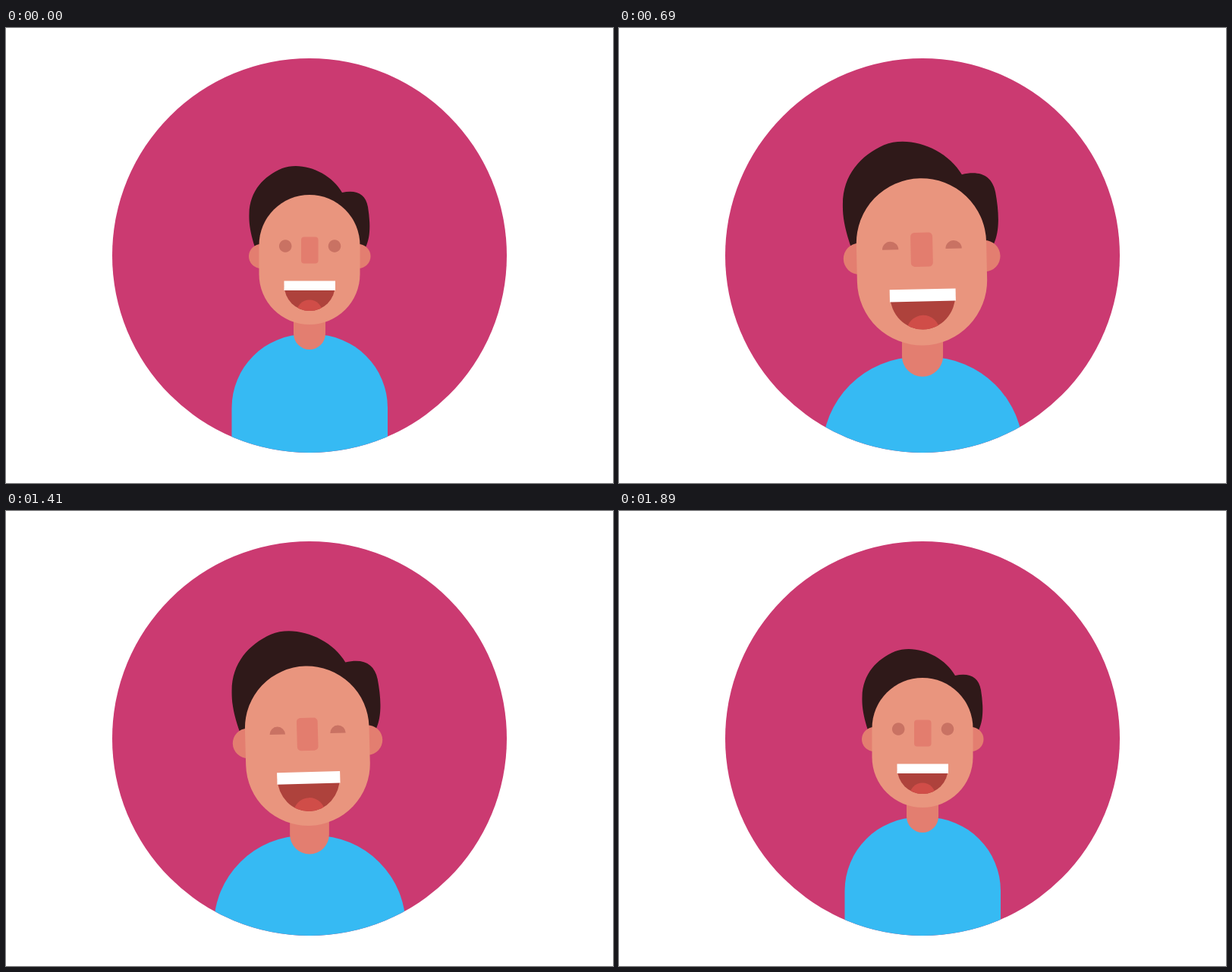
These frames come from a looping animation (800x600 px, 1950 ms). An HTML page:

```html
<!DOCTYPE html>
<html lang="en">
<head>
<meta charset="utf-8">
<title>Laughing man</title>
<style>
  html, body { margin: 0; height: 100%; overflow: hidden; background: #fff; }
  svg { display: block; width: 100vw; height: 100vh; }
</style>
</head>
<body>
<svg viewBox="0 0 800 600">
  <clipPath id="disc"><circle cx="400" cy="300" r="260"/></clipPath>
  <clipPath id="mouthClip"><path class="mouth"/></clipPath>
  <circle cx="400" cy="300" r="260" fill="#cb3a71"/>
  <g clip-path="url(#disc)">
    <g id="man">
      <path fill="#36baf3" d="M297.5 620V501A97 97 0 0 1 394.5 404H406A97 97 0 0 1 503 501V620Z"/>
      <rect x="379" y="340" width="42" height="84" rx="21" fill="#e37e70"/>
      <g id="head">
        <path fill="#2f1919" d="M328 289C322 270 320 258 320.5 245C321 215 340 195 364 185C390 175 428 190 443 217C462 213 474 219 477 236C480 255 481 275 474 289Z"/>
        <g fill="#e37e70">
          <circle cx="336" cy="301" r="16"/>
          <circle cx="464.5" cy="301" r="16"/>
        </g>
        <rect x="333.5" y="220" width="133" height="171" rx="66.5" fill="#e9957e"/>
        <rect x="389" y="275.5" width="22.5" height="35" rx="4" fill="#e37d6e"/>
        <path id="eyes" fill="#c97263"/>
        <path class="mouth" fill="#ae423c"/>
        <g clip-path="url(#mouthClip)"><circle id="tongue" cx="400" r="17" fill="#d04d48"/></g>
        <rect x="366.5" y="333.5" width="67.5" height="12.5" fill="#fff"/>
      </g>
    </g>
  </g>
</svg>
<script>
const LOOP = 1950, EYE_R = 8.3;
const $ = id => document.getElementById(id);
const mouths = document.querySelectorAll('.mouth');

const ease = (t, from, to) => {
  const u = Math.min(1, Math.max(0, (t - from) / (to - from)));
  return u * u * (3 - 2 * u);
};
// Eases from 0 to 1 between a and b, and back between c and d.
const pulse = (t, a, b, c, d) => ease(t, a, b) - ease(t, c, d);
const wave = (t, peak, period) => (1 + Math.cos(2 * Math.PI * (t - peak) / period)) / 2;

function eye(x, closed) {
  const k = EYE_R * Math.min(1 - closed, 0.995);
  const w = Math.sqrt(EYE_R * EYE_R - k * k);
  const y = 287.5 + EYE_R - 3.3 * closed;
  return `M${x - w} ${y}A${EYE_R} ${EYE_R} 0 1 1 ${x + w} ${y}Z`;
}

function draw(t) {
  const grow = pulse(t, 270, 630, 1240, 1835);
  const nod = pulse(t, 50, 350, 1470, 1890);
  const closed = pulse(t, 120, 420, 1430, 1825);
  const bob = wave(t, 180, 300);
  const drop = 2.7 * nod * bob;
  const tilt = -nod * (1.05 + 0.55 * bob);
  const gape = 3.3 * grow * wave(t, 55, 150);

  $('man').setAttribute('transform',
    `translate(400 300) scale(${1 + 0.288 * grow}) translate(-400 -300)`);
  $('head').setAttribute('transform',
    `translate(${-0.95 * drop} ${drop}) rotate(${tilt} 400 300)`);
  $('eyes').setAttribute('d', eye(368.2, closed) + eye(433, closed));
  for (const m of mouths)
    m.setAttribute('d', `M366.7 339.5A33.5 ${33.5 + gape} 0 0 0 433.7 339.5Z`);
  $('tongue').setAttribute('cy', 375.5 + gape);
}

const start = performance.now();
function tick() {
  draw((performance.now() - start) % LOOP);
  requestAnimationFrame(tick);
}
tick();
</script>
</body>
</html>
```
